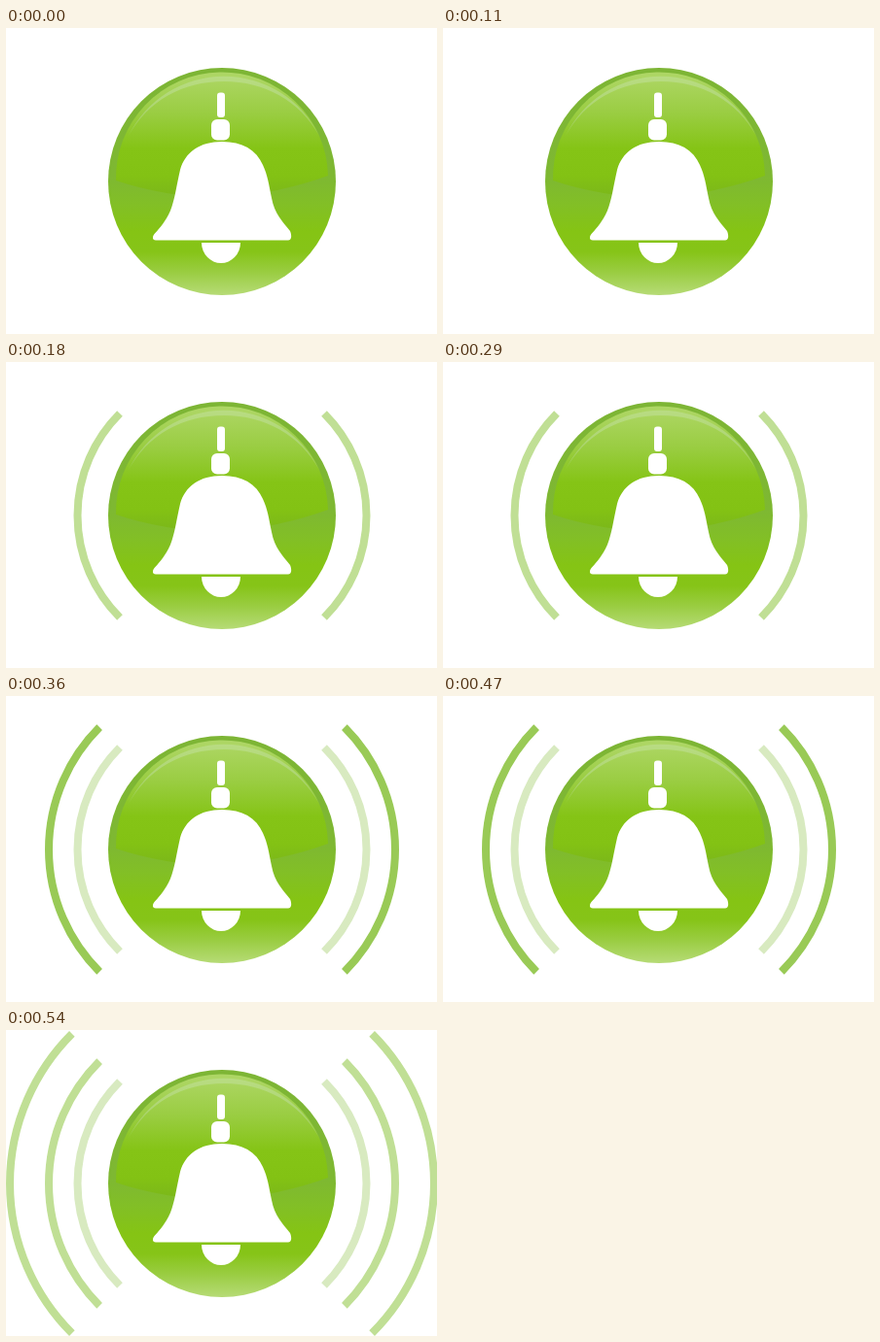
Animation, 443 px wide and 315 px high, one loop 0.72 s. Source, as an HTML page:

```html
<!DOCTYPE html>
<html lang="en">
<head>
<meta charset="utf-8">
<title>Ringing bell</title>
<style>
  html, body { margin: 0; width: 100%; height: 100%; overflow: hidden; background: #fff; }
  svg { display: block; width: 100%; height: 100%; }
</style>
</head>
<body>
<svg viewBox="0 0 443 315" xmlns="http://www.w3.org/2000/svg">
  <defs>
    <linearGradient id="base" gradientUnits="userSpaceOnUse" x1="0" y1="41" x2="0" y2="275">
      <stop offset="0" stop-color="#7db535"/>
      <stop offset=".48" stop-color="#7eb832"/>
      <stop offset=".6" stop-color="#82bf26"/>
      <stop offset=".72" stop-color="#85c414"/>
      <stop offset=".81" stop-color="#86c418"/>
      <stop offset=".9" stop-color="#9acd42"/>
      <stop offset="1" stop-color="#b6db76"/>
    </linearGradient>
    <linearGradient id="gloss" gradientUnits="userSpaceOnUse" x1="0" y1="49" x2="0" y2="178">
      <stop offset="0" stop-color="#add664"/>
      <stop offset=".3" stop-color="#9acd42"/>
      <stop offset=".58" stop-color="#85c416"/>
      <stop offset=".8" stop-color="#83c214"/>
      <stop offset="1" stop-color="#79b51b"/>
    </linearGradient>
    <linearGradient id="shine" gradientUnits="userSpaceOnUse" x1="0" y1="49" x2="0" y2="112">
      <stop offset="0" stop-color="#b9dc83"/>
      <stop offset=".5" stop-color="#aed674"/>
      <stop offset="1" stop-color="#9ccd52"/>
    </linearGradient>
  </defs>
  <rect width="443" height="315" fill="#fff"/>
  <g id="waves" fill="none" stroke-width="8"></g>
  <circle cx="222" cy="158" r="117" fill="url(#base)"/>
  <path fill="url(#gloss)" d="M113 157A109 109 0 0 1 331 152Q285 169 222 176Q160 173 113 157Z"/>
  <path fill="url(#shine)" d="M126 111A109 109 0 0 1 322 111C302 75 266 55 224 55C181 55 146 75 126 111Z"/>
  <g fill="#fff">
    <rect x="217" y="66.5" width="8" height="25.5" rx="3"/>
    <rect x="211" y="94" width="19" height="21.5" rx="6"/>
    <path d="M222 117C199 117 184 128 179 146C175 163 174 175 169 188C164 199 159 205 152.5 212C150 215 150.500 218.500 154 218.500H290C293.500 218.500 294 214 292 209C284 199 276 191 273 175C270 160 269 152 264 141C257 125 243 117 222 117Z"/>
    <path d="M201 221H241A20 21 0 0 1 201 221Z"/>
  </g>
</svg>
<script>
  const STEP = 180;
  const CENTER = { x: 222, y: 158 };
  const RADII = [148.5, 178, 218];
  const PALE = "#d8eac0", SOFT = "#c0df95", STRONG = "#99ca56";
  // Colours of the inner, middle and outer wave at each step.
  const STEPS = [
    [],
    [SOFT],
    [PALE, STRONG],
    [PALE, SOFT, SOFT]
  ];

  // A quarter arc on each side of the button.
  function wavePath(r) {
    const d = r * Math.SQRT1_2;
    const side = (s, sweep) =>
      `M${CENTER.x + s * d} ${CENTER.y - d}A${r} ${r} 0 0 ${sweep} ${CENTER.x + s * d} ${CENTER.y + d}`;
    return side(-1, 0) + side(1, 1);
  }

  const group = document.getElementById("waves");
  const waves = RADII.map(r => {
    const path = document.createElementNS("http://www.w3.org/2000/svg", "path");
    path.setAttribute("d", wavePath(r));
    return group.appendChild(path);
  });

  function draw(ms) {
    const colors = STEPS[Math.floor(ms / STEP) % STEPS.length];
    waves.forEach((wave, i) => wave.setAttribute("stroke", colors[i] || "none"));
  }

  const start = performance.now();
  function tick() {
    draw(performance.now() - start);
    requestAnimationFrame(tick);
  }
  tick();
</script>
</body>
</html>
```
